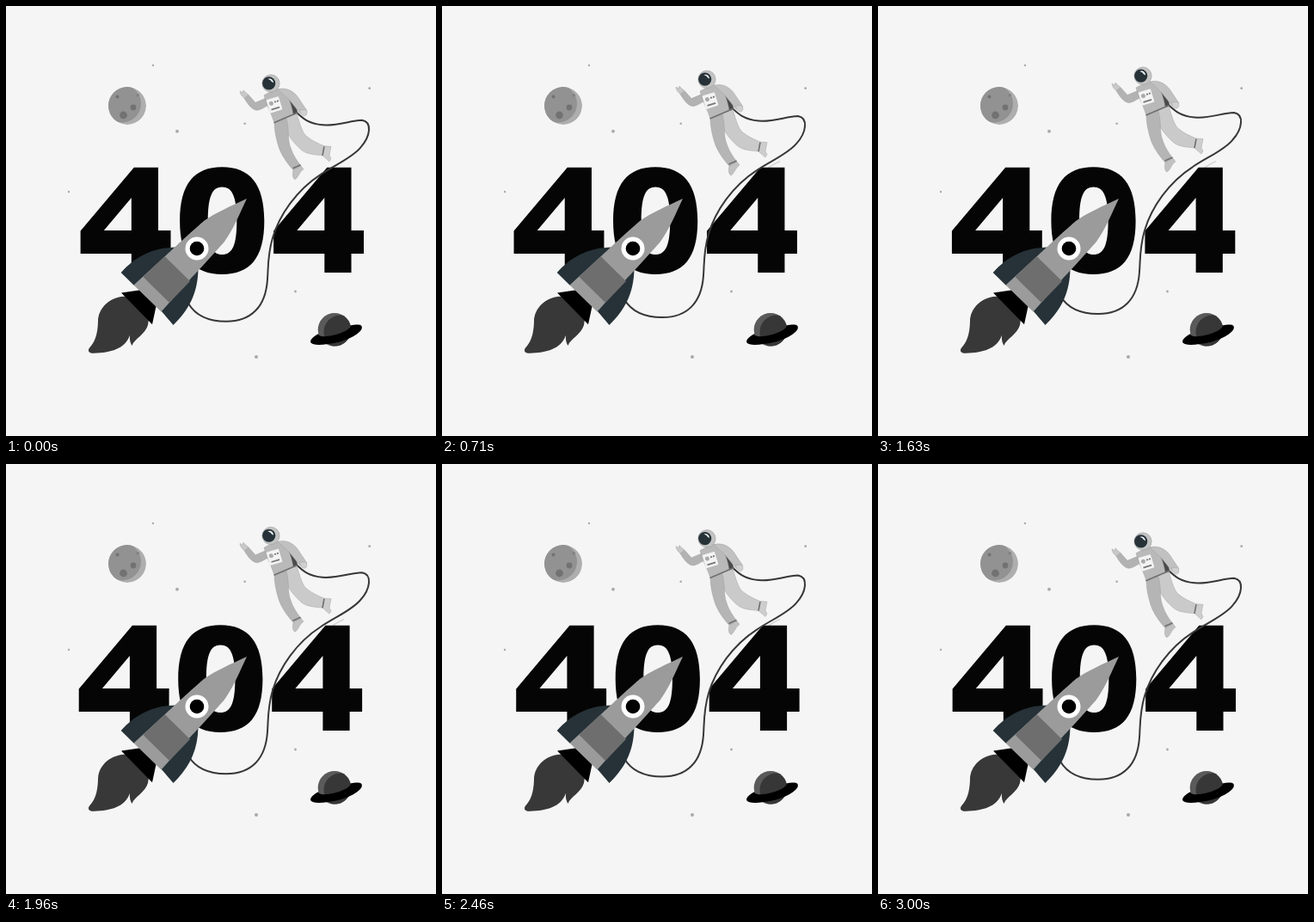
An HTML page for the animation above (3040 ms loop, 500 px wide and 500 px high).

```html
<!DOCTYPE html>
<html lang="en">
<head>
<meta charset="utf-8">
<title>404</title>
<style>
  html, body { margin: 0; width: 100%; height: 100%; overflow: hidden; background: #f5f5f5; }
  svg { display: block; width: 100%; height: 100%; }
</style>
</head>
<body>
<svg viewBox="0 0 500 500" role="img" aria-label="404">
  <defs>
    <clipPath id="moonClip"><circle cx="141" cy="116" r="22"/></clipPath>
    <clipPath id="planetClip"><circle cx="382" cy="376.3" r="19.3"/></clipPath>
    <path id="four" fill-rule="evenodd" d="M86.800 261.500L149 187.800H177.200V261H191.700V288H177.200V310H146V288H86.800ZM114 261H146V223Z"/>
  </defs>

  <g id="stars" fill="#a9a9a9"></g>

  <g clip-path="url(#moonClip)">
    <circle cx="141" cy="116" r="22" fill="#aeaeae"/>
    <circle cx="135" cy="113.500" r="22" fill="#929292"/>
    <g fill="#727272">
      <circle cx="136.500" cy="127" r="4.400"/>
      <circle cx="148" cy="118" r="3.400"/>
      <circle cx="129.500" cy="105.500" r="2"/>
      <circle cx="153.300" cy="103.800" r="1.900" fill="#838383"/>
    </g>
  </g>

  <g clip-path="url(#planetClip)">
    <circle cx="382" cy="376.300" r="20" fill="#5a5a5a"/>
    <circle cx="389" cy="379" r="19.500" fill="#373737"/>
  </g>
  <path d="M363.500 381C356 385 353 389 354.500 391.500C357 395.500 372 394 386 391C398 388 412 381 413.700 375C415 370.500 410 369.500 400.500 371.500C402 375 392 380 382 382.500C372 385 363 385 363.500 381Z"/>

  <path d="M379 188.500Q386 183.500 393 180.500" fill="none" stroke="#d6d6d6" stroke-width="1.600"/>

  <g id="digits" fill="#050505">
    <use href="#four"/>
    <use href="#four" x="224.500"/>
    <path fill-rule="evenodd" d="M202.300 250C202.300 207 219 187.300 251.400 187.300S300.500 207 300.500 250S284 312 251.400 312S202.300 293 202.300 250ZM235 250C235 221 240 210.500 251.500 210.500S268.500 221 268.500 250S263 289 251.500 289S235 279 235 250Z"/>
  </g>

  <g id="astronaut">
    <path d="M338 124C345 131 352 137 368 138.500C387 140 400 133 414 133C426 135 424 152 412 165C402 177 382 185 366 196C338 214 318 243 310 270C304 290 305 305 304 318C302 350 285 367 256 367C232 367 219 358 212 346L206 334" fill="none" stroke="#373737" stroke-width="2"/>
    <g stroke="#999" stroke-width=".4" stroke-linejoin="round">
      <path d="M303 107L290 112.500L282 103.500L277 107.500C282 116 287 121.500 292 121.500C297 121 302 117 306 115Z" fill="#b2b2b2"/>
      <path d="M277 107.500C274 105 272 102 272 99L275 101L276 98L279 101L282 103.500Z" fill="#c8c8c8"/>
      <path d="M321 131L338 125C342 138 345 149 350 152C356 157 363 160 370 163L368 174C357 173 349 172 344 168C336 161 326 151 321 131Z" fill="#cacaca"/>
      <path d="M370 163L378 163.500L376 174L378 177.500L376 181L368 174Z" fill="#cdcdcd"/>
      <path d="M312 136L326 131C330 147 327 155 331 165C334 174 339 181 343 186L334 191C326 182 320 173 317 164C314 154 312 145 312 136Z" fill="#b5b5b5"/>
      <path d="M334 191L343 186L346 190C341 193 340 200 336 202C333 200 333 196 334 191Z" fill="#c1c1c1"/>
      <path d="M300 104C305 101 312 98 317 97C323 98 328 103 331 110L338 124L312 136C309 127 306 121 303 114Z" fill="#b9b9b9"/>
      <path d="M328.500 107L337 116L339.500 125L334 126.500C333 120 331 113 328.500 107Z" fill="#4a4a4a"/>
      <path d="M316 97C328 94 337 101 342 110L350 122L342 125L329 109Z" fill="#c1c1c1"/>
      <path d="M341.500 121L348.500 120.500C351 124 350 128 347 128C344 128 342 125 341.500 121Z" fill="#d0d0d0"/>
    </g>
    <path d="M311.500 136L338.500 124.500M333.500 189L342.500 185M370 163.500L368 174" fill="none" stroke="#707070" stroke-width="1.600"/>
    <g transform="translate(312 115) rotate(-17)">
      <rect x="-7.500" y="-8" width="15" height="16" rx="1" fill="#f3f3f3"/>
      <circle cx="-3" cy="-2.500" r="2.500" fill="#aaa"/>
      <path d="M1 -3h2M4 -3h2M-5 4.500H5" stroke="#777" stroke-width="1.800"/>
    </g>
    <circle cx="308" cy="90.200" r="10.200" fill="#c2c2c2" stroke="#999" stroke-width=".5"/>
    <circle cx="305.700" cy="90" r="7.600" fill="#263238"/>
    <path d="M304.500 85C308 83.500 311 86 311 89.500Q308.500 88.500 307.500 86.500Z" fill="#f4f4f4"/>
  </g>

  <g id="rocket">
    <path d="M141 337.500C121 337.500 107 351 107 367C106.500 383 103 391 97 397.500C94.500 401 96.500 404 102 403.800C122 403 138 399 144 383C143.500 388 144.500 392 146.500 395C149 387 162 382 165 371L168 350Z" fill="#383838"/>
    <path d="M134 333.500L158 330L175 347L170 370.300Z"/>
    <path d="M133.700 310C150 292 169 281 198 280.500L149 325Z M223.500 306C223 335 212 354 194.500 371L180 354Z" fill="#263238"/>
    <path d="M280 224C263 232 242 241 230 250C222 257 203 274 185 291L148.500 324.500L180.500 355.500L213 319C230 301 247 282 254 274C263 262 272 241 280 224Z" fill="#9b9b9b"/>
    <path d="M184.500 291L214 320L190 345L159.500 315Z" fill="#6e6e6e"/>
    <circle cx="222" cy="282" r="13.500" fill="#fff"/>
    <circle cx="222" cy="282" r="8.300"/>
  </g>
</svg>
<script>
const $ = id => document.getElementById(id);
const LOOP = 3040, FLOAT = 3000, SHAKE = 1500, LEAD = 25;
const shakeKeys = [0, -1, 2, -4, 4, -4, 4, -4, 2, -1, 0];

const stars = [[171, 69, 1.2], [199, 145.700, 1.9], [277.700, 136.800, 1.3], [422.700, 95.700, 1.4],
  [73, 216, 1.2], [336.500, 332, 1.4], [291, 408, 2]];
$("stars").innerHTML = stars.map(([x, y, r]) => `<circle cx="${x}" cy="${y}" r="${r}"/>`).join("");

function shake(t) {
  const p = t % SHAKE / SHAKE * 10, i = Math.floor(p);
  return shakeKeys[i] + (shakeKeys[i + 1] - shakeKeys[i]) * (p - i);
}

// Triangle wave: up 10 px and back at constant speed
function float(t) {
  const p = t % FLOAT / FLOAT;
  return -10 * (1 - Math.abs(1 - 2 * p));
}

function draw(now) {
  const t = now % LOOP + LEAD;
  $("digits").setAttribute("transform", `translate(${shake(t)} 0)`);
  $("astronaut").setAttribute("transform", `translate(0 ${float(t)})`);
  requestAnimationFrame(draw);
}
draw(0);
</script>
</body>
</html>
```
